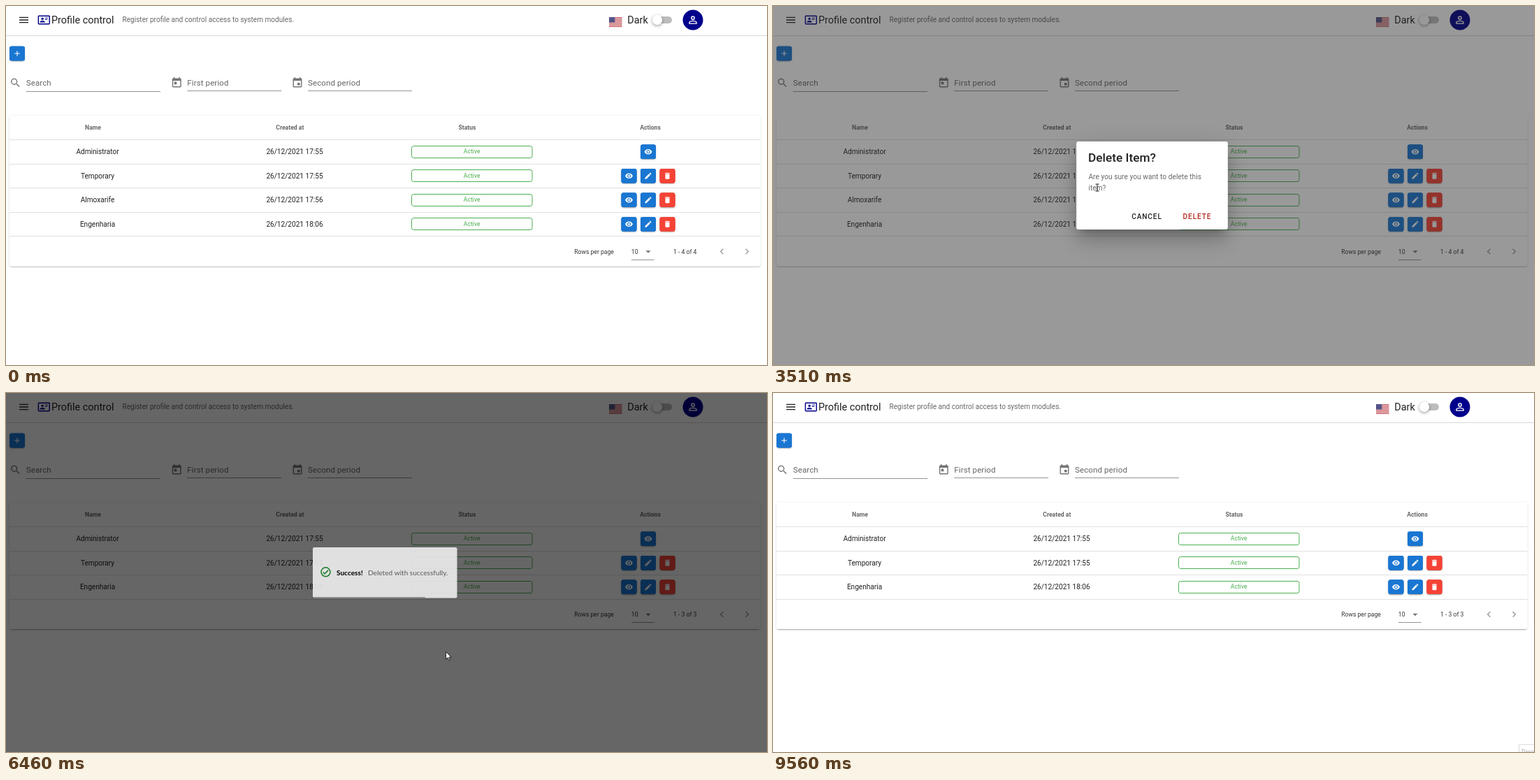
These frames come from a looping animation (1089x514 px, 9630 ms). An HTML page with a canvas:

```html
<!DOCTYPE html>
<html lang="en">
<head>
<meta charset="utf-8">
<title>Profile control</title>
<style>
html, body { margin: 0; width: 100%; height: 100%; overflow: hidden; background: #fff; }
canvas { display: block; }
</style>
</head>
<body>
<canvas id="stage" width="1089" height="514"></canvas>
<script>
const W = 1089, H = 514, LOOP = 9630;
const BLUE = '#1976d2', RED = '#f44336', GREEN = '#4caf50', NAVY = '#00008b';
const ink = a => `rgba(0,0,0,${a})`;

const screen = document.getElementById('stage').getContext('2d');
const buffer = Object.assign(document.createElement('canvas'), { width: W, height: H }).getContext('2d');
let g = screen;

// Timing
const clamp = x => Math.min(1, Math.max(0, x));
function bezier(x1, y1, x2, y2) {
  const at = (p, q, s) => 3 * p * s * (1 - s) ** 2 + 3 * q * s * s * (1 - s) + s ** 3;
  return x => {
    if (x <= 0 || x >= 1) return clamp(x);
    let lo = 0, hi = 1;
    for (let i = 0; i < 24; i++) {
      const mid = (lo + hi) / 2;
      if (at(x1, x2, mid) < x) lo = mid; else hi = mid;
    }
    return at(y1, y2, lo);
  };
}
const linear = x => x;
const ease = bezier(.25, .1, .25, 1);
const swift = bezier(.25, .8, .25, 1);
const slide = bezier(.16, .81, .32, 1);
const spring = bezier(.25, 1.6, .25, 1);
const ramp = (t, start, length, curve = linear) => curve(clamp((t - start) / length));

// Icons on a 24 unit grid
const icons = {
  menu: 'M3 6H21V8H3ZM3 11H21V13H3ZM3 16H21V18H3Z',
  plus: 'M19 13H13V19H11V13H5V11H11V5H13V11H19Z',
  search: 'M9.5 3A6.5 6.5 0 0 1 14.44 13.73L14.71 14H15.5L20.5 19L19 20.5L14 15.5V14.71L13.73 14.44A6.5 6.5 0 1 1 9.5 3M9.5 5A4.5 4.5 0 1 0 9.5 14A4.5 4.5 0 1 0 9.5 5Z',
  eye: 'M12 9A3 3 0 0 0 12 15A3 3 0 0 0 12 9M12 17A5 5 0 0 1 12 7A5 5 0 0 1 12 17M12 4.5C7 4.5 2.73 7.61 1 12C2.73 16.39 7 19.5 12 19.5C17 19.5 21.27 16.39 23 12C21.27 7.61 17 4.5 12 4.5Z',
  pencil: 'M20.71 7.04C21.1 6.65 21.1 6 20.71 5.63L18.37 3.29C18 2.9 17.35 2.9 16.96 3.29L15.12 5.12L18.87 8.87ZM3 17.25V21H6.75L17.81 9.93L14.06 6.18Z',
  trash: 'M19 4H15.5L14.5 3H9.5L8.5 4H5V6H19ZM6 19A2 2 0 0 0 8 21H16A2 2 0 0 0 18 19V7H6Z',
  today: 'M7 10H12V15H7ZM19 19H5V8H19ZM19 3H18V1H16V3H8V1H6V3H5A2 2 0 0 0 3 5V19A2 2 0 0 0 5 21H19A2 2 0 0 0 21 19V5A2 2 0 0 0 19 3Z',
  event: 'M12 12H17V17H12ZM19 19H5V8H19ZM19 3H18V1H16V3H8V1H6V3H5A2 2 0 0 0 3 5V19A2 2 0 0 0 5 21H19A2 2 0 0 0 21 19V5A2 2 0 0 0 19 3Z',
  card: 'M22 3H2A2 2 0 0 0 0 5V19A2 2 0 0 0 2 21H22A2 2 0 0 0 24 19V5A2 2 0 0 0 22 3M22 19H2V5H22ZM14 17V15.75C14 14.09 10.66 13.25 9 13.25C7.34 13.25 4 14.09 4 15.75V17ZM9 7A2.5 2.5 0 0 0 9 12A2.5 2.5 0 0 0 9 7M14 7V8H20V7ZM14 9V10H20V9ZM14 11V12H18V11Z',
  person: 'M12 4A4 4 0 0 1 12 12A4 4 0 0 1 12 4M12 6A2 2 0 0 0 12 10A2 2 0 0 0 12 6M12 13C14.67 13 20 14.33 20 17V20H4V17C4 14.33 9.33 13 12 13M12 14.9C9.03 14.9 5.9 16.36 5.9 17V18.1H18.1V17C18.1 16.36 14.97 14.9 12 14.9Z',
  down: 'M7 10L12 15L17 10Z',
  left: 'M15.41 16.58L10.83 12L15.41 7.41L14 6L8 12L14 18Z',
  right: 'M8.59 16.58L13.17 12L8.59 7.41L10 6L16 12L10 18Z',
  check: 'M12 2A10 10 0 0 0 12 22A10 10 0 0 0 12 2M12 20A8 8 0 0 1 12 4A8 8 0 0 1 12 20M16.59 7.58L10 14.17L7.41 11.59L6 13L10 17L18 9Z'
};
for (const name in icons) icons[name] = new Path2D(icons[name]);
const arrow = new Path2D('M0 0V10.6L2.5 8.3L4.1 12L5.8 11.3L4.2 7.7H7.6Z');

// Drawing helpers
function icon(name, x, y, size, color) {
  g.save();
  g.translate(x - size / 2, y - size / 2);
  g.scale(size / 24, size / 24);
  g.fillStyle = color;
  g.fill(icons[name], 'evenodd');
  g.restore();
}

function text(str, x, y, size, color, { weight = 400, align = 'left', gap = 0, family = 'Roboto' } = {}) {
  g.font = `${weight} ${size}px ${family}, sans-serif`;
  g.letterSpacing = gap * size + 'px';
  g.textAlign = align;
  g.fillStyle = color;
  g.fillText(str, x, y + size * .355);
}

function rect(x, y, w, h, color) {
  g.fillStyle = color;
  g.fillRect(x, y, w, h);
}

function round(x, y, w, h, r, color) {
  g.beginPath();
  g.roundRect(x, y, w, h, r);
  g.fillStyle = color;
  g.fill();
}

function disc(x, y, r, color) {
  g.beginPath();
  g.arc(x, y, r, 0, 7);
  g.fillStyle = color;
  g.fill();
}

// Each shadow: vertical offset, blur, inset, opacity
const LOW = [[2.2, .7, 1.4, .2], [1.4, 1.4, 0, .14], [.7, 3.6, 0, .12]];
const HIGH = [[8, 11, 5, .2], [17, 28, 0, .16], [6.5, 33, 0, .14]];
function raised(x, y, w, h, color, shadows = LOW) {
  g.save();
  for (const [dy, blur, inset, a] of shadows) {
    g.shadowOffsetY = dy;
    g.shadowBlur = blur;
    g.shadowColor = ink(a);
    round(x + inset, y + inset, w - 2 * inset, h - 2 * inset, 2.9, color);
  }
  g.restore();
  round(x, y, w, h, 2.9, color);
}

function layer(alpha, draw) {
  if (alpha <= 0) return;
  g = buffer;
  g.clearRect(0, 0, W, H);
  g.save();
  draw();
  g.restore();
  g = screen;
  g.globalAlpha = Math.min(1, alpha);
  g.drawImage(buffer.canvas, 0, 0);
  g.globalAlpha = 1;
}

// Page
const ROW = 34.56, TOP = 157;
const profiles = [
  ['Administrator', '17:55'], ['Temporary', '17:55'], ['Almoxarife', '17:56'], ['Engenharia', '18:06']
];

function button(x, y, name, color, size = 12) {
  raised(x - 10.9, y - 10.2, 21.8, 20.4, color);
  icon(name, x, y, size, '#fff');
}

function flag(x, y, w, h) {
  rect(x, y, w, h, '#eee');
  for (let i = 0; i < 13; i += 2) rect(x, y + i * h / 13, w, h / 13, '#c8414b');
  rect(x, y, w * .45, h * .54, '#46467f');
  for (let i = 0; i < 12; i++) rect(x + 1 + i % 4 * 2, y + 1 + (i >> 2) * 2.4, .7, .7, '#c9c9dc');
}

function header() {
  rect(0, 42, W, 1, ink(.15));
  icon('menu', 25.5, 20, 17.28, ink(.87));
  icon('card', 54.3, 20, 17.28, NAVY);
  text('Profile control', 65, 20, 14.4, ink(.87));
  text('Register profile and control access to system modules.', 166.5, 19.8, 10.08, ink(.6));
  flag(863, 16, 18.5, 14);
  text('Dark', 889.3, 20, 14.4, ink(.87));
  round(927, 15, 26, 10, 5, '#bdbdbd');
  g.save();
  g.shadowOffsetY = 1.4;
  g.shadowBlur = 4;
  g.shadowColor = ink(.4);
  disc(932, 20, 7.2, '#fff');
  g.restore();
  disc(983, 20, 14.5, NAVY);
  icon('person', 983, 20, 17.28, '#fff');
}

function field(name, iconX, x, end, label, lineY) {
  icon(name, iconX, 110, 17.28, ink(.54));
  text(label, x, 110, 11.52, ink(.6), { gap: .0094 });
  rect(x, lineY, end - x, 1, ink(.42));
}

function table(t, mouse) {
  const rows = profiles.filter((p, i) => i !== 2 || t < 5075);
  const end = TOP + ROW * (rows.length + 1);
  const hover = t > 260 && t < 1280 ? Math.floor((mouse.y - TOP) / ROW) - 1 : -1;
  raised(5, TOP, 1074.5, end - TOP + 42.6, '#fff');
  [['Name', 124.5], ['Created at', 406.3], ['Status', 660], ['Actions', 922]].forEach(([s, x]) =>
    text(s, x, 174.2, 8.64, ink(.6), { weight: 700, align: 'center' }));
  rows.forEach(([name, time], i) => {
    const top = TOP + ROW * (i + 1), y = top + 17.1;
    if (i === hover) rect(5, top, 1074.5, ROW, '#eee');
    rect(5, Math.floor(top), 1074.5, 1, ink(.12));
    text(name, 131, y, 10.08, ink(.87), { align: 'center' });
    text('26/12/2021 ' + time, 413, y, 10.08, ink(.87), { align: 'center' });
    g.beginPath();
    g.roundRect(580.5, Math.round(y) - 8.5, 172.5, 17, 2.9);
    g.strokeStyle = GREEN;
    g.lineWidth = 1;
    g.stroke();
    text('Active', 666.7, y - .4, 8.64, GREEN, { align: 'center' });
    if (i) {
      button(891.5, y, 'eye', BLUE);
      button(946.5, y, 'trash', RED);
    }
    button(919, y, i ? 'pencil' : 'eye', BLUE);
  });
  rect(5, Math.floor(end), 1074.5, 1, ink(.12));

  const y = end + 21.7, n = rows.length;
  text('Rows per page', 813.2, y, 8.64, ink(.8));
  text('10', 894.8, y, 8.64, ink(.8));
  icon('down', 919, y + .2, 17.28, ink(.54));
  rect(895, Math.round(y + 11.3), 32.5, 1, ink(.42));
  text(`1 - ${n} of ${n}`, 955, y, 8.64, ink(.8));
  icon('left', 1024.5, y, 17.28, ink(.38));
  icon('right', 1060.5, y, 17.28, ink(.38));
}

function loader(t) {
  if (t < 4965 || t >= 5075) return;
  const p = ramp(t, 4985, 1320, ease);
  const from = Math.max(0, -2 + 3.07 * p), to = Math.min(1, 1.08 * p);
  rect(5, 191.5, 1074.5, 2.9, 'rgba(25,118,210,.3)');
  rect(5 + from * 1074.5, 191.5, (to - from) * 1074.5, 2.9, BLUE);
}

function page(t, mouse) {
  rect(0, 0, W, H, '#fff');
  header();
  button(16, 68, 'plus', BLUE, 13);
  field('search', 13.5, 28.8, 221, 'Search', 122);
  field('today', 244.3, 259.3, 394, 'First period', 121);
  field('event', 417, 432, 581, 'Second period', 121);
  table(t, mouse);
  loader(t);
}

function dialog(t) {
  const shown = ramp(t, 1280, 300, swift) - ramp(t, 4935, 300, swift);
  if (shown <= 0) return;
  rect(0, 0, W, H, `rgba(33,33,33,${.46 * shown})`);
  layer(shown, () => {
    const k = .5 + .5 * shown;
    g.translate(542.5, 257);
    g.scale(k, k);
    g.translate(-542.5, -257);
    raised(434.5, 194, 216, 126, '#fff', HIGH);
    text('Delete Item?', 451, 217, 17.28, ink(.87), { weight: 500 });
    text('Are you sure you want to delete this', 451.4, 244.2, 10.08, ink(.6), { gap: .0071 });
    text('item?', 451.4, 260, 10.08, ink(.6), { gap: .0071 });
    if (t > 4000) round(574.5, 288, 64, 26, 2.9, `rgba(211,47,47,${.07 + .2 * ramp(t, 4790, 160)})`);
    const style = { weight: 500, align: 'center', gap: .0893 };
    text('CANCEL', 535, 301.2, 10.08, ink(.87), style);
    text('DELETE', 607, 301.2, 10.08, '#b3261e', style);
  });
}

function toast(t) {
  const leave = 1 - ramp(t, 7275, 500, ease);
  const dim = .6 * ramp(t, 5060, 500, ease) * leave;
  if (dim > 0) rect(0, 0, W, H, ink(dim));
  const rise = ramp(t, 5124, 700, ease);
  layer(rise * leave, () => {
    g.translate(0, 72 * (1 - rise));
    round(439, 221, 206.5, 72.5, 2.2, 'rgba(238,238,238,.9)');
    rect(439, 292, 206.5 * (1 - ramp(t, 5355, 5000)), 1.5, ink(.35));
    const part = (str, x, start, color, weight) => {
      const p = ramp(t, start, 1000, slide);
      g.globalAlpha = p;
      text(str, x + 36 * (1 - p), 257, 10.08, color, { weight, family: 'Lato' });
    };
    part('Success!', 473, 5255, '#000', 700);
    part('Deleted with successfully.', 518, 5160, ink(.6), 400);
    const pop = ramp(t, 5355, 1000, spring);
    g.globalAlpha = clamp(pop);
    if (pop > 0) icon('check', 457.5, 256.3, 17.28 * (.3 + .7 * pop), '#1b7a2b');
  });
}

function hint(t) {
  layer(ramp(t, 8890, 210) * (t < 9560 ? 1 : .5), () => {
    rect(1067, 503, 60, 30, '#bbb');
    rect(1068, 504, 60, 30, '#fff');
    text('Parar', 1071, 514, 8.4, '#575757');
  });
}

// Pointer: time, x, y
const path = [
  [260, 1050, 494], [850, 948, 256], [1220, 947, 278], [1940, 947, 278], [2250, 592, 252],
  [2900, 470, 232], [3240, 443, 254], [3510, 464, 260], [4210, 586, 297], [4340, 600, 297],
  [5010, 601, 297], [5290, 596, 322], [5700, 604, 345], [6670, 633, 374], [7300, 633, 392],
  [7700, 633, 392], [8500, 1052, 513]
];
function pointer(t) {
  const i = path.findIndex(p => p[0] > t);
  if (i < 1) return { x: -50, y: -50 };
  const [a, b] = [path[i - 1], path[i]];
  let p = (t - a[0]) / (b[0] - a[0]);
  p = p * p * (3 - 2 * p);
  return { x: a[1] + (b[1] - a[1]) * p, y: a[2] + (b[2] - a[2]) * p };
}

function cursor(t, { x, y }) {
  const onText = t > 2150 && t < 4200 && x > 450 && x < 617 && y > 205 && y < 270;
  g.save();
  g.translate(x, y);
  if (onText) {
    rect(-.5, -5, 1, 10, '#222');
    for (const end of [-5.5, 4.5]) rect(-2.5, end, 5, 1, '#222');
  } else {
    g.fillStyle = '#fff';
    g.fill(arrow);
    g.strokeStyle = '#111';
    g.lineWidth = .9;
    g.stroke(arrow);
  }
  g.restore();
}

function frame(now) {
  const t = now % LOOP, mouse = pointer(t);
  page(t, mouse);
  dialog(t);
  toast(t);
  hint(t);
  cursor(t, mouse);
}

const start = performance.now();
(function tick() {
  frame(performance.now() - start);
  requestAnimationFrame(tick);
})();
</script>
</body>
</html>
```
